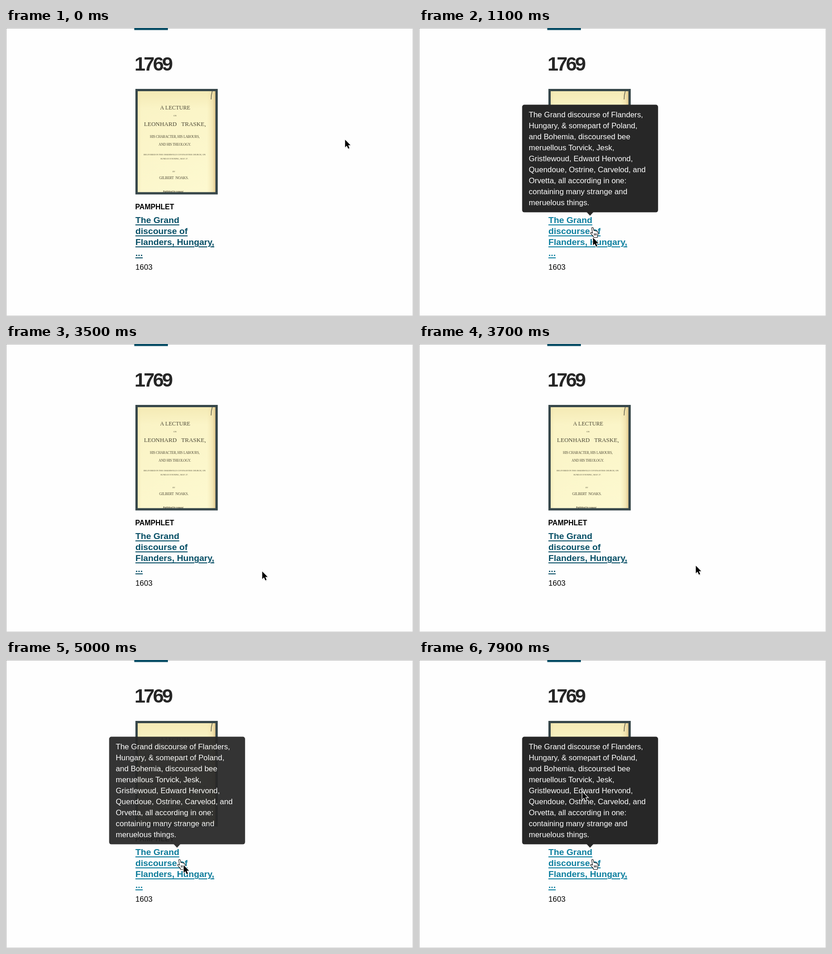
An HTML page that plays this animation: 890 by 629 pixels, repeating every 8 s.

```html
<!DOCTYPE html>
<html lang="en">
<head>
<meta charset="utf-8">
<title>Timeline card</title>
<style>
html, body { margin: 0; width: 100%; height: 100%; overflow: hidden; background: #fefefe; }
body { position: relative; font-family: "Liberation Sans", Arial, sans-serif; }
svg, div, p { position: absolute; margin: 0; }
svg { left: 0; top: 0; }
.serif { font-family: "Liberation Serif", "Times New Roman", serif; text-anchor: middle; fill: #4b4735; }
#link {
  left: 283px; top: 408px; font: bold 19.2px/24px "Liberation Sans", Arial, sans-serif; white-space: pre;
  text-decoration: underline 2px; text-underline-offset: 3px;
}
#tip p { left: 240px; top: 177.7px; color: #fff; font-size: 16.8px; line-height: 24px; white-space: pre; }
</style>
</head>
<body>
<svg width="890" height="629">
  <defs>
    <linearGradient id="across">
      <stop offset="0" stop-color="#e6d9a4" stop-opacity=".5"/>
      <stop offset=".06" stop-color="#f2e6b0" stop-opacity=".1"/>
      <stop offset=".88" stop-color="#f2e6b0" stop-opacity="0"/>
      <stop offset=".96" stop-color="#ead69c" stop-opacity=".6"/>
      <stop offset="1" stop-color="#c9ab70"/>
    </linearGradient>
    <linearGradient id="down" x2="0" y2="1">
      <stop offset="0" stop-color="#f4eab4"/>
      <stop offset=".18" stop-color="#fbf5c8"/>
      <stop offset="1" stop-color="#fdf9d0"/>
    </linearGradient>
  </defs>
  <path d="M0 .5H890M.5 0V629" stroke="#b4b4b4"/>
  <path d="M889.5 0V629M0 628.5H890" stroke="#d0d0d0"/>
  <path fill="#064c64" d="M280.500 0h73.500v4.500h-73.500z"/>
  <text x="281" y="93" font-size="43" font-weight="bold" letter-spacing="-3.8" fill="#262626">1769</text>

  <path fill="url(#down)" d="M286 136h174v225H286z"/>
  <path fill="url(#across)" d="M286 136h174v225H286z"/>
  <path d="M451 138L449 147L448.500 156" fill="none" stroke="#6b6a58" stroke-width="1.6"/>
  <g class="serif">
    <text x="370" y="178" font-size="12" letter-spacing=".1">A LECTURE</text>
    <text x="369.500" y="193" font-size="4.500">ON</text>
    <text x="369.500" y="214" font-size="13" word-spacing="7">LEONHARD TRASKE,</text>
    <text x="369" y="240" font-size="7.500" letter-spacing="-.2">HIS CHARACTER, HIS LABOURS,</text>
    <text x="369" y="256.500" font-size="7.500" letter-spacing="-.2">AND HIS THEOLOGY.</text>
    <text x="368.500" y="277.500" font-size="4.700">DELIVERED IN THE OSKERWOLD COVENANTER CHURCH, ON</text>
    <text x="368" y="287" font-size="4.700">SUNDAY EVENING, MAY 27.</text>
    <text x="367" y="315" font-size="4">BY</text>
    <text x="367" y="329.500" font-size="8" letter-spacing="-.2" word-spacing="2">GILBERT NOAKS.</text>
    <text x="365.500" y="359" font-size="5.200" font-style="italic" font-weight="bold">Published by request</text>
  </g>
  <path fill="none" stroke="#37474a" stroke-width="5" d="M285.500 135.500h175v225.500h-175z"/>

  <text x="282.500" y="395.500" font-size="15.700" font-weight="bold">PAMPHLET</text>
  <text x="283" y="527.500" font-size="16.800">1603</text>
</svg>

<div id="link">The Grand
discourse of
Flanders, Hungary,
...</div>

<div id="tip">
<svg width="890" height="629" fill="#272727">
  <rect x="225.500" y="167.600" width="297.300" height="235" rx="5"/>
  <path d="M366.500 402h15l-7.500 8z"/>
</svg>
<p>The Grand discourse of Flanders,
Hungary, &amp; somepart of Poland,
and Bohemia, discoursed bee
meruellous Torvick, Jesk,
Gristlewoud, Edward Hervond,
Quendoue, Ostrine, Carvelod, and
Orvetta, all according in one:
containing many strange and
meruelous things.</p>
</div>

<svg width="890" height="629">
  <g id="hand" transform="translate(374.500 434.500)" stroke="#111" stroke-width="1.2" stroke-linejoin="round">
    <path fill="#fff" d="M5 13.500L3.200 3.200Q3 1 4.800 1Q6.300 1 6.800 3L8 8Q9.500 7 10.600 8.600Q12.200 7.600 13.200 9.200Q15.500 8.600 16.500 11Q18 15 16 18.500L15.500 23H7.500Q6.500 19.500 2.500 16Q0 13.500 1 12.500Q2.500 11.500 5 13.500Z"/>
    <path d="M8.700 14v4.500M11 14v4.500M13.300 14v4.500"/>
  </g>
  <g id="arrow">
    <path d="M1 3V20L5 17L8 23L11 21.500L8 15H13Z" opacity=".15"/>
    <path d="M.5 1V17.500L4.300 14L7.200 20.500L10 19.300L7.200 13H12.300Z" stroke="#fff" stroke-width="2.400" paint-order="stroke"/>
  </g>
</svg>

<script>
const LOOP = 8000, STEP = 100;
const $ = id => document.getElementById(id);

// Pointer gestures: each curves from the previous end, pulled towards `via`
const home = [741, 243];
const moves = [
  { from: 0, until: 1100, via: [467, 609], to: [380, 457] },
  { from: 2800, until: 4000, via: [555, 532], to: [631, 466] },
  { from: 4100, until: 5200, via: [397, 437], to: [384, 449] },
  { from: 5500, until: 6500, via: [372, 330], to: [361, 211] },
  { from: 7600, until: 8000, via: [358, 256], to: [356, 301] }
];

const ramp = (t, a, b) => Math.min(1, Math.max(0, (t - a) / (b - a)));
const ease = p => p * p * (3 - 2 * p);

function pointer(t) {
  let pos = home;
  for (const { from, until, via, to } of moves) {
    const p = ease(ramp(t, from, until)), q = 1 - p;
    if (p) pos = pos.map((v, i) => q * q * v + 2 * q * p * via[i] + p * p * to[i]);
  }
  return pos;
}

function draw() {
  const t = Math.floor(performance.now() % LOOP / STEP) * STEP;
  const shown = ramp(t, 780, 1080) - ramp(t, 2900, 3400) + ramp(t, 4700, 5020);
  $("arrow").setAttribute("transform", `translate(${pointer(t)})`);
  $("tip").style.opacity = $("hand").style.opacity = shown;
  $("link").style.color = `color-mix(in srgb, #0d7f9f ${shown * 100}%, #074f66)`;
  requestAnimationFrame(draw);
}
draw();
</script>
</body>
</html>
```
